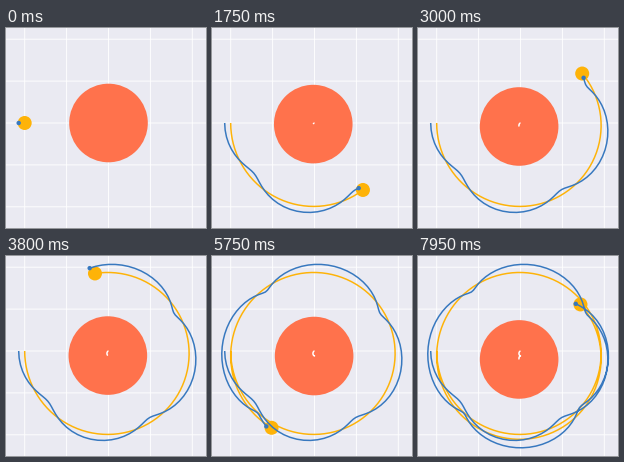
Write a matplotlib script that moves like this. It is 200 px wide and 200 px high and loops after 8000 ms.

```python
import numpy as np
import matplotlib.pyplot as plt
from matplotlib.animation import FuncAnimation
from matplotlib.patches import Circle

FRAMES, INTERVAL = 160, 50
SIZE, DPI = 200, 100
PX = 72 / DPI

BACK, SUN, EARTH, MOON = "#eaeaf2", "#ff724c", "#feb308", "#3778bf"

CENTER = np.array([102.5, 95.0])
GRID = 41.9
AXIS, ECC = 83.0, 0.0099     # planet's orbit, starting at its far point
DRIFT = 0.78                 # size of the star's cycloid wobble
RATE = np.radians(3.655)     # planet's mean motion per frame


def kepler(mean, ecc):
    """Angle and relative distance on an ellipse, counted from its far end."""
    e = mean.copy()
    for _ in range(30):
        e -= (e + ecc * np.sin(e) - mean) / (1 + ecc * np.cos(e))
    angle = 2 * np.arctan2(np.sqrt(1 - ecc) * np.sin(e / 2),
                           np.sqrt(1 + ecc) * np.cos(e / 2))
    return angle, 1 + ecc * np.cos(e)


def moon_orbit(theta):
    """Moon's angle from the outward direction and its distance.

    The star's pull slowly stretches the small orbit and lengthens its
    month, then lets both relax again over eight months.
    """
    grid = np.linspace(0, 8, 2000)
    months = np.interp(np.degrees(theta),
                       89 * grid - 12 * np.sin(np.pi * grid / 4), grid)
    swell = np.cos(np.pi * months / 4)
    angle, dist = kepler(2 * np.pi * months, 0.28 - 0.2 * swell)
    return angle, dist * (5.8 - 0.25 * swell)


def orbits():
    mean = RATE * np.arange(FRAMES)
    theta, dist = kepler(mean, ECC)
    theta = mean - 2 * ECC * np.sin(mean)

    out = np.column_stack([-np.cos(theta), np.sin(theta)])
    ahead = np.column_stack([np.sin(theta), np.cos(theta)])
    wobble = np.column_stack([np.cos(theta) - 1, theta - np.sin(theta)])

    sun = CENTER + DRIFT * wobble
    earth = sun + AXIS * dist[:, None] * out

    psi, r = (v[:, None] for v in moon_orbit(theta))
    moon = earth + r * (np.cos(psi) * out + np.sin(psi) * ahead)
    return sun, earth, moon


fig = plt.figure(figsize=(SIZE / DPI, SIZE / DPI), dpi=DPI, facecolor=BACK)
ax = fig.add_axes([0, 0, 1, 1])
ax.set_xlim(0, SIZE)
ax.set_ylim(SIZE, 0)
ax.axis("off")

for k in range(-2, 3):
    x, y = CENTER + GRID * k
    style = dict(color="white", lw=0.9 * PX, zorder=0, snap=False)
    ax.axvline(x, **style)
    ax.axhline(y, **style)

paths = orbits()
discs, trails = [], []
styles = [(SUN, 39.3, "white"), (EARTH, 7, EARTH), (MOON, 2.2, MOON)]
for level, (color, size, line) in enumerate(styles):
    disc = Circle(CENTER, size, fc=color, ec="none", zorder=1 + 2 * level)
    discs.append(ax.add_patch(disc))
    trails += ax.plot([], [], color=line, lw=1.5 * PX, zorder=2 + 2 * level,
                      solid_capstyle="butt", solid_joinstyle="round")


def draw(n):
    for path, disc, trail in zip(paths, discs, trails):
        disc.center = tuple(path[n])
        trail.set_data(path[:n + 1, 0], path[:n + 1, 1])
    return discs + trails


anim = FuncAnimation(fig, draw, frames=FRAMES, interval=INTERVAL,
                     repeat=True, repeat_delay=0, blit=False)
plt.show()
```
